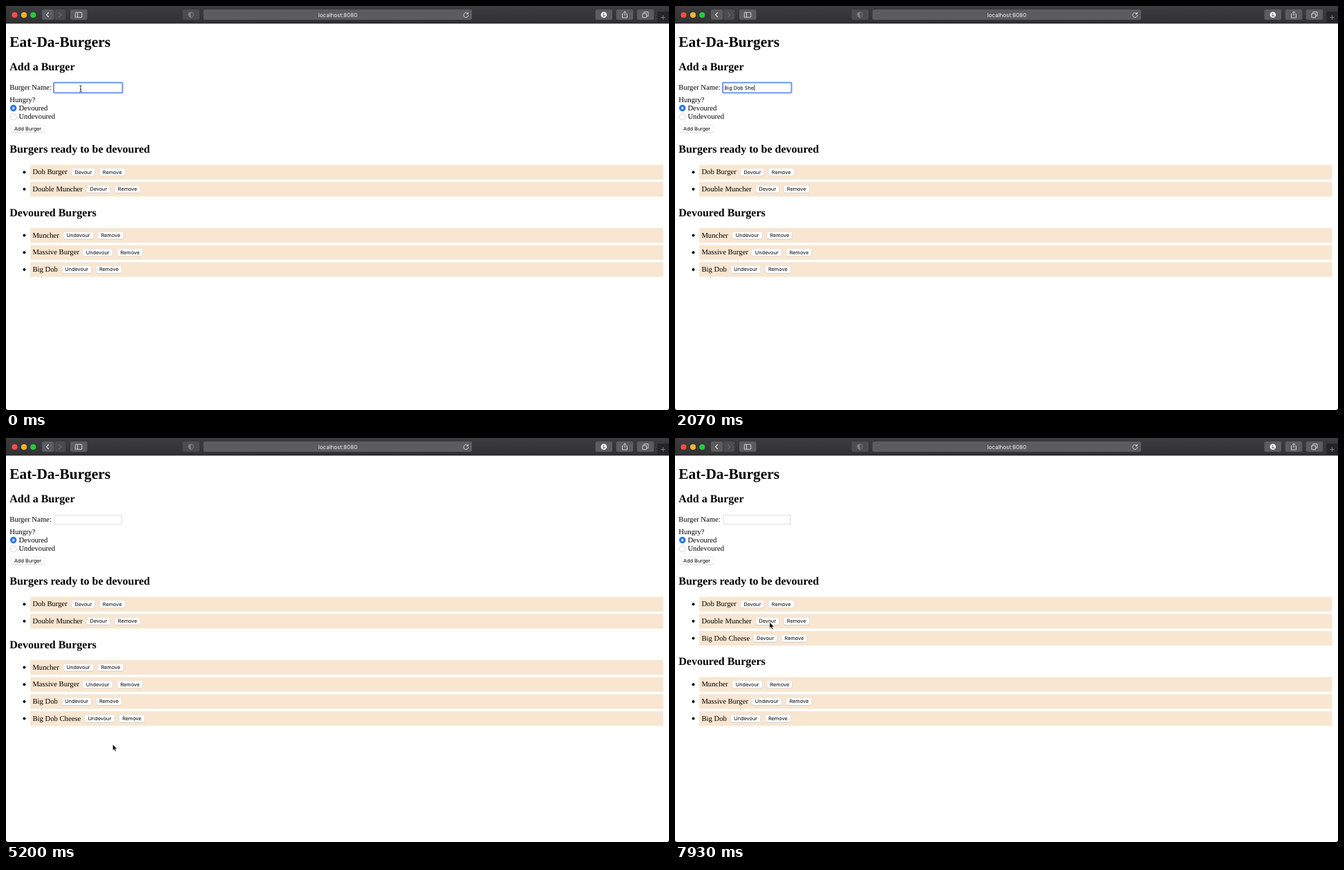
Animation, 959 px wide and 584 px high, one loop 8 s. Source, as an HTML page:

```html
<!DOCTYPE html>
<html lang="en">
<head>
<meta charset="utf-8">
<title>Eat-Da-Burgers</title>
<style>
html, body { margin: 0; width: 100%; height: 100%; overflow: hidden; background: #000; }
svg { display: block; width: 100%; height: 100%; }
text { white-space: pre; text-rendering: geometricPrecision; }
.serif { font: 10.67px "Liberation Serif", serif; }
.h1 { font: bold 21.33px "Liberation Serif", serif; }
.h2 { font: bold 16px "Liberation Serif", serif; }
.ui { font: 7.3px Inter, sans-serif; }
.menu { font: 8.5px Inter, sans-serif; fill: #fff; }
.url { font: 8px Inter, sans-serif; fill: #f2f2f2; }
.mid { text-anchor: middle; }
.icon { fill: none; stroke: #dcdcdc; stroke-width: .9; }
</style>
</head>
<body>
<svg viewBox="0 0 959 584">
  <defs>
    <linearGradient id="bar" x2="0" y2="1">
      <stop stop-color="#3d3d3f"/><stop offset="1" stop-color="#313133"/>
    </linearGradient>
  </defs>
  <path d="M0 20H959V580.5Q959 584 955.5 584H3.5Q0 584 0 580.5Z" fill="#fff"/>
  <g id="chrome"></g>
  <g id="page"></g>
  <g id="field"></g>
  <g id="menu"></g>
  <path id="ibeam" d="M106.3 115Q108 115 108 116.2V122.8Q108 124 106.3 124M109.7 115Q108 115 108 116.2M108 122.8Q108 124 109.7 124M107 120.5H109" fill="none" stroke="#222" stroke-width=".9"/>
  <path id="arrow" d="M0 0V9.2L2.1 7.2 3.6 10.5 5.2 9.8 3.8 6.7H6.6Z" fill="#000" stroke="#fff" stroke-width=".7"/>
</svg>
<script>
const LOOP = 8000, PITCH = 24.67;
const SUBMIT = 3600, PRESS = 6730, MOVED = 7000;
const $ = id => document.getElementById(id);

const rect = (x, y, w, h, fill, rx = 0, more = '') =>
  `<rect x="${x}" y="${y}" width="${w}" height="${h}" rx="${rx}" fill="${fill}" ${more}/>`;
const dot = (x, y, r, fill, more = '') => `<circle cx="${x}" cy="${y}" r="${r}" fill="${fill}" ${more}/>`;
const text = (x, y, cls, s, more = '') => `<text x="${x}" y="${y}" class="${cls}" ${more}>${s}</text>`;
const icon = (d, more = '') => `<path class="icon" d="${d}" ${more}/>`;

function chrome() {
  const key = (x, w, fill = '#5c5c5e') => rect(x, 5, w, 15, fill, 2.5);
  return rect(0, 0, 959, 25, 'url(#bar)') + rect(0, 24.4, 959, 1, '#161617') +
    dot(12.5, 13, 4.1, '#fb4c45') + dot(26, 13, 4.1, '#efb62a') + dot(39.3, 13, 4.1, '#2ac83f') +
    key(52, 17) + key(69.6, 16.6, '#4b4b4d') + key(93, 24.5) + key(255.5, 24.5, '#4c4c4e') + key(285.5, 388.5) +
    key(852.5, 24.5) + key(882.7, 24.5) + key(912.7, 24.5) +
    icon('M61.8 9.3L58.6 12.7 61.8 16.1', 'style="stroke:#f0f0f0;stroke-width:1.1"') +
    icon('M76.4 9.3L79.6 12.7 76.4 16.1', 'style="stroke:#858587"') +
    icon('M100.3 9.3H109.7V16.3H100.3ZM103.4 9.3V16.3') +
    icon('M267.5 9L271 10.2V13.2Q270.7 15.6 267.5 17 264.3 15.6 264 13.2V10.2Z', 'style="stroke:#858587"') +
    '<path d="M267.5 9V17Q264.3 15.6 264 13.2V10.2Z" fill="#858587"/>' +
    text(480, 15.8, 'url mid', 'localhost:8080') +
    icon('M668.2 11.2A3.4 3.4 0 1 0 668.8 13M668.6 9V11.6H666') +
    dot(864.8, 12.7, 4.3, '#fff') +
    icon('M864.8 10V15M862.8 13.2L864.8 15.2 866.8 13.2', 'style="stroke:#4a4a4c"') +
    icon('M893 11.4H891.6V17H898.4V11.4H897M895 14V8M893 9.8L895 7.8 897 9.8') +
    icon('M920.8 11H926.6V16.6H920.8ZM923 11V8.6H929V14.4H926.6') +
    rect(942.5, 8, 17, 17, '#252527') + icon('M947.2 16.6H953.6M950.4 13.4V19.8', 'style="stroke:#8c8c8e"');
}

function button(x, y, w, label, down) {
  return rect(x, y + .5, w, 10.8, down ? '#2f67d8' : '#c9c9c9', 2.2) +
    rect(x, y, w, 10.6, down ? '#3878ee' : '#fff', 2.2, down ? '' : 'stroke="#d9d9d9" stroke-width=".5"') +
    text(x + w / 2, y + 8, 'ui mid', label, down ? 'fill="#fff"' : '');
}

// each burger: name, x of its first button
const dob = ['Dob Burger', 95], twin = ['Double Muncher', 117], munch = ['Muncher', 83],
  massive = ['Massive Burger', 111], big = ['Big Dob', 80.5], cheese = ['Big Dob Cheese', 113.7];

function list(title, base, items, verb, pressed) {
  const w = verb === 'Devour' ? 33.6 : 43.2;
  return text(5.3, base, 'h2', title) + items.map(([name, x], i) => {
    const y = base + 17.4 + i * PITCH;
    return rect(35, y, 915.5, 21.2, '#f8e6d1') + dot(26.5, y + 10.6, 2, '#000') +
      text(38.4, y + 13.7, 'serif', name) +
      button(x, y + 5.2, w, verb, items[i] === pressed) +
      button(x + w + 6.8, y + 5.2, 36.6, 'Remove');
  }).join('');
}

function page(stage) {
  const ready = [dob, twin], eaten = [munch, massive, big];
  if (stage === 3) ready.push(cheese);
  else if (stage > 0) eaten.push(cheese);
  return text(5.3, 59, 'h1', 'Eat-Da-Burgers') + text(5.3, 93.4, 'h2', 'Add a Burger') +
    text(5.3, 121.2, 'serif', 'Burger Name:') + text(5.3, 138.6, 'serif', 'Hungry?') +
    dot(10.7, 147.6, 4.8, '#2f78f2') + dot(10.7, 147.6, 1.6, '#fff') + text(18.4, 150.7, 'serif', 'Devoured') +
    dot(10.7, 160.3, 4.5, '#fff', 'stroke="#c6c6c6" stroke-width=".7"') + text(18.4, 163.4, 'serif', 'Undevoured') +
    button(7, 171.8, 49, 'Add Burger') +
    list('Burgers ready to be devoured', 212.2, ready, 'Devour') +
    list('Devoured Burgers', 254.2 + ready.length * PITCH, eaten, 'Undevour', stage === 2 && cheese);
}

// typing: "<" deletes one character
const keys = 'Big Dob She<<<Cheese';
const times = [470, 1000, 1070, 1200, 1270, 1400, 1470, 1530, 1600, 1730, 1800,
  2130, 2200, 2270, 2400, 2470, 2600, 2670, 2800, 2870];
function typed(t) {
  let s = '';
  times.forEach((at, i) => {
    if (t >= at) s = keys[i] === '<' ? s.slice(0, -1) : s + keys[i];
  });
  return s;
}

function field(s, focus, caret) {
  const box = focus
    ? rect(69, 110.8, 99.5, 14.7, '#fff', 1, 'stroke="#6c98ec" stroke-width="2"')
    : rect(70, 111.3, 97.6, 13.4, '#fff', 0, 'stroke="#d2d2d2" stroke-width=".7"');
  $('field').innerHTML = box + text(71.6, 120.9, 'ui', s);
  if (caret) {
    const x = 72 + (s ? $('field').querySelector('text').getComputedTextLength() : 0);
    $('field').innerHTML += rect(x, 113.8, .8, 8.8, '#111');
  }
}

const people = ['Badri Hosnel', 'Belto', 'Bahira AbdelNoor', "Baldwin O'Rell", 'Bakoum Ezat'];
$('chrome').innerHTML = chrome();
$('menu').innerHTML =
  '<path d="M68.7 125.3H198.5Q201.5 125.3 201.5 128.3V209Q201.5 213 197.5 213H72.7Q68.7 213 68.7 209Z" fill="#69696b" stroke="#59595b" stroke-width=".6"/>' +
  people.map((p, i) => text(80, 137.7 + i * 17.3, 'menu', p)).join('');

// pointer stops: time, x, y
const stops = [[4130, 108, 119], [4730, 125, 163], [4870, 125, 163], [5000, 154.3, 442.7], [5200, 154.3, 442.7],
  [5530, 152, 427], [6000, 152, 427], [6470, 140.5, 407.5], [7060, 140.5, 407.5],
  [7530, 136.5, 290], [7600, 136.5, 290], [7930, 136.8, 266.2], [LOOP, 136.8, 266.2]];
function pointer(t) {
  const i = stops.findIndex(p => p[0] > t);
  const [t0, x0, y0] = stops[i - 1], [t1, x1, y1] = stops[i];
  const k = (t - t0) / (t1 - t0), e = k * k * (3 - 2 * k);
  return `translate(${x0 + (x1 - x0) * e} ${y0 + (y1 - y0) * e})`;
}

const show = (id, on) => $(id).setAttribute('visibility', on ? 'visible' : 'hidden');
let pageKey, fieldKey;
function draw(t) {
  const stage = t < SUBMIT ? 0 : t < PRESS ? 1 : t < MOVED ? 2 : 3;
  if (stage !== pageKey) $('page').innerHTML = page(pageKey = stage);

  const focus = stage === 0, s = focus ? typed(t) : '', caret = focus && t >= 70;
  const key = [s, focus, caret].join();
  if (key !== fieldKey) { fieldKey = key; field(s, focus, caret); }

  show('menu', t >= 530 && t < 1000);
  show('ibeam', t < 470);
  const moving = t >= stops[0][0];
  show('arrow', moving);
  if (moving) $('arrow').setAttribute('transform', pointer(t));
}

const start = performance.now();
function tick() {
  draw((performance.now() - start) % LOOP);
  requestAnimationFrame(tick);
}
tick();
</script>
</body>
</html>
```
